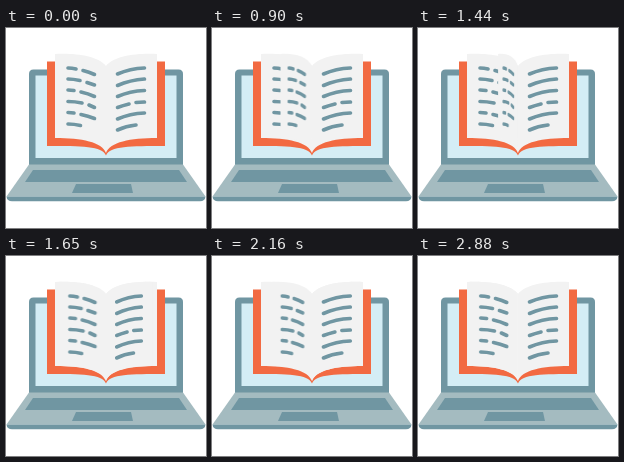
Recreate the animation shown at these times as an HTML page. Size 200 by 200 pixels, loop 3930 ms.

```html
<!DOCTYPE html>
<html lang="en">
<head>
<meta charset="utf-8">
<title>Book on a laptop</title>
<style>
  html, body { margin: 0; width: 100%; height: 100%; overflow: hidden; background: #fff; }
  svg { display: block; width: 100vw; height: 100vh; }
  .dark { fill: #7096a2; }
  .light { fill: #a4bbc0; }
  .cover { fill: #f26a42; }
  .paper { fill: #f2f2f2; }
  .ink { fill: none; stroke: #7096a2; stroke-width: 3.6; stroke-linecap: round; }

  /* A page lifts for 430 ms and lands for 370 ms of the 3930 ms loop. */
  .turn use {
    transform: scaleX(0);
    transform-origin: 100px 0;
    animation: 3930ms var(--at) infinite;
  }
  .turn .lift { animation-name: lift; }
  .turn .land { animation-name: land; }
  .turn:nth-of-type(1) { --at: 330ms; }
  .turn:nth-of-type(2) { --at: 930ms; }
  .turn:nth-of-type(3) { --at: 1530ms; }
  .turn:nth-of-type(4) { --at: 2130ms; }

  @keyframes lift {
    0% { transform: scaleX(1); animation-timing-function: cubic-bezier(.333, 0, .667, .333); }
    10.941%, 100% { transform: scaleX(0); }
  }
  @keyframes land {
    0% { transform: scaleX(0); }
    10.941% { transform: scaleX(0); animation-timing-function: cubic-bezier(.333, .667, .667, 1); }
    20.356% { transform: scaleX(1); animation-timing-function: step-end; }
    20.36%, 100% { transform: scaleX(0); }
  }
</style>
</head>
<body>
<svg viewBox="0 0 200 200">
  <defs>
    <g id="left">
      <path class="paper" d="M49 26C70 25 92 28 100 38V125C96 114 76 110 49 110Z"/>
      <path class="ink" d="M62 40Q66 40 70 41M77 42.500Q83 44 88.500 46.500
        M62 51Q67 51 74 52.500M81 54.500L88.500 57
        M62 62Q65 62 68 62.500M75 64Q82 65.500 88.500 68.500
        M62 73.500Q69 73.500 76 75M83 77L88.500 79.500
        M62 84.500Q65 84.500 68 85M75 86.500Q82 88 88.500 90.500
        M62 96Q68 96 74.500 97.500"/>
    </g>
    <g id="right">
      <path class="paper" d="M151 26C130 25 108 28 100 38V125C104 114 124 110 151 110Z"/>
      <path class="ink" d="M111.500 46Q124 40.500 138.500 40
        M111.500 57.500Q124 52 138.500 51
        M111.500 68.500Q124 63 138.500 62.500
        M111.500 79.500Q117 77.500 123 76M130 74.500L138.500 74
        M111.500 91Q124 85.500 138.500 85
        M111.500 102Q120 98 130 97"/>
    </g>
  </defs>

  <path class="dark" d="M23 139V46Q23 41.500 27.500 41.500H172.500Q177 41.500 177 46V139Z"/>
  <rect x="29.500" y="47.500" width="141" height="82.500" fill="#d4edf5"/>
  <path class="light" d="M23 136.500H177L199.500 168.500H.5Z"/>
  <path class="dark" d="M27 142H173L181 154H19Z"/>
  <path class="dark" d="M70 156H125L127 165H66Z"/>
  <path class="dark" d="M.5 168.500H199.500Q199 173.200 194 173.200H6Q1 173.200 .5 168.500Z"/>

  <path class="cover" d="M41 33.500H60V60H140V33.500H159V118C124 118 104 118 100 127.500C96 118 76 118 41 118Z"/>
  <use href="#left"/>
  <use href="#right"/>
  <g>
    <g class="turn"><use class="lift" href="#right"/><use class="land" href="#left"/></g>
    <g class="turn"><use class="lift" href="#right"/><use class="land" href="#left"/></g>
    <g class="turn"><use class="lift" href="#right"/><use class="land" href="#left"/></g>
    <g class="turn"><use class="lift" href="#right"/><use class="land" href="#left"/></g>
  </g>
</svg>
</body>
</html>
```
